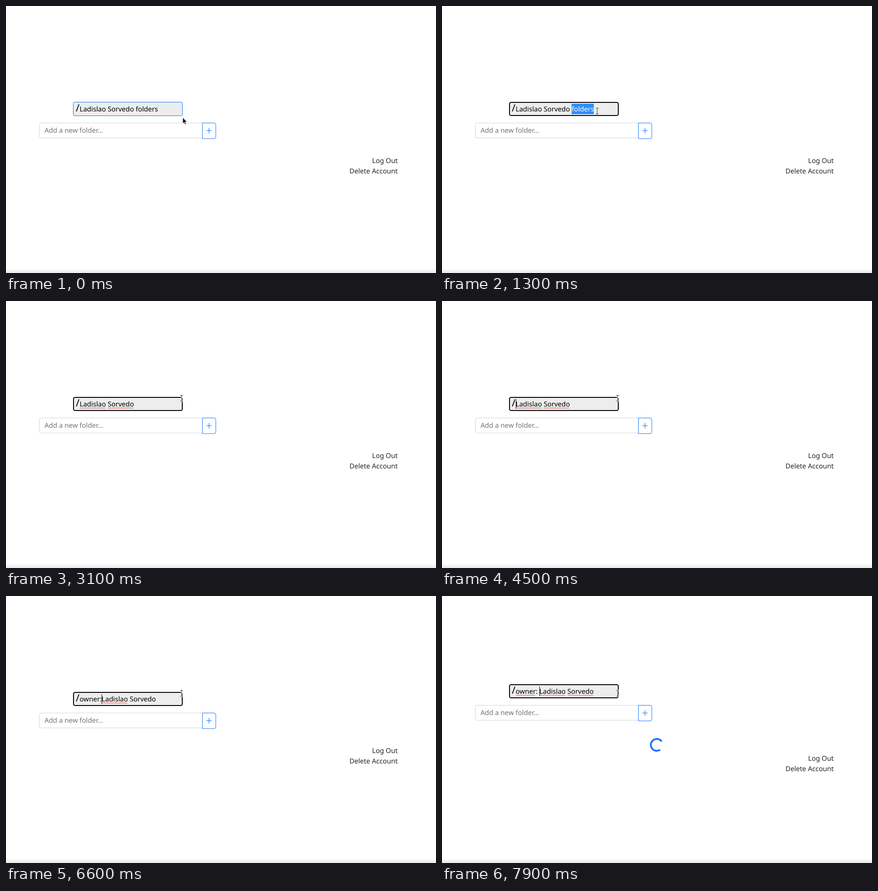
These frames come from a looping animation (949x590 px, 8000 ms). An HTML page:

```html
<!DOCTYPE html>
<html lang="en">
<head>
<meta charset="utf-8">
<title>Folder rename</title>
<style>
  html, body { margin: 0; width: 100%; height: 100%; overflow: hidden; background: #fff; }
  svg { display: block; width: 949px; height: 590px; }
  text {
    font: 15px "Noto Sans", sans-serif;
    white-space: pre;
    text-rendering: geometricPrecision;
  }
  .slash { font-size: 22px; font-weight: 500; }
  .hint { fill: #6c757d; }
  .links { fill: #212529; text-anchor: end; }
  .tip { font-size: 13.125px; fill: #fff; text-anchor: middle; }
  .accent { fill: none; stroke: #0d6efd; }
</style>
</head>
<body>
<svg viewBox="0 0 949 590">
  <defs>
    <linearGradient id="shade" x2="0" y2="1">
      <stop offset="0" stop-color="#fff"/>
      <stop offset="1" stop-color="#e9e9e9"/>
    </linearGradient>
    <linearGradient id="track" x2="0" y2="1">
      <stop offset="0" stop-color="#dedede"/>
      <stop offset=".3" stop-color="#ececec"/>
      <stop offset="1" stop-color="#eaeaea"/>
    </linearGradient>
  </defs>

  <rect y="580" width="949" height="10" fill="url(#shade)"/>

  <g id="upper">
    <rect id="field" rx="3.5" fill="#ededed"/>
    <text class="slash" x="154" y="233">/</text>
    <rect id="selection" y="216" height="23" fill="#308cff"/>
    <text id="title" x="162.6" y="233"><tspan id="head"></tspan><tspan id="tail"></tspan></text>
    <path id="squiggle" fill="none" stroke="#f01010" stroke-width=".9"/>
    <rect id="caret" y="217" width="1" height="21"/>

    <path d="M433 258.5H77.5a4 4 0 0 0-4 4v25a4 4 0 0 0 4 4H433" fill="none" stroke="#ced4da"/>
    <text class="hint" x="85" y="280">Add a new folder...</text>
    <path class="accent" d="M433.500 258.500h25.500a4 4 0 0 1 4 4v26.500a4 4 0 0 1-4 4h-25.500z"/>
    <path class="accent" d="M442.500 275.500h11M448 270v11" stroke-width="1.200" stroke-linecap="round"/>
  </g>

  <circle id="spinner" class="accent" cx="474" cy="329" r="13.125" stroke-width="3.75"
          pathLength="360" stroke-dasharray="270 90" transform="rotate(55 474 329)"/>

  <g id="lower" class="links">
    <text x="864.5" y="347">Log Out</text>
    <text x="864.5" y="369.500">Delete Account</text>
  </g>

  <g id="tooltip">
    <rect x="401" y="215" width="186" height="27" rx="3.75" fill="#1a1a1a"/>
    <text class="tip" x="494" y="233">Double click to modify</text>
  </g>

  <g id="scrollbar">
    <rect y="577" width="949" height="13" fill="url(#track)"/>
    <rect x="13" y="579" width="654" height="10" fill="#b8b8b8"/>
    <path d="M8 581v6l-4-3z" fill="#888"/>
    <path d="M941 581v6l4-3z" fill="#222"/>
  </g>

  <path id="arrow" d="M0 0V13.500L3.200 10.700L5.300 15.300L7.500 14.300L5.400 9.800H9.500Z"
        fill="#111" stroke="#fff" stroke-width=".8" transform="translate(390 246.500)"/>
  <g id="beam" fill="none">
    <path d="M-3-6.500H-1L0-6L1-6.500H3M0-6V6M-3 6.500H-1L0 6L1 6.500H3" stroke="#fff" stroke-width="3"/>
    <path d="M-3-6.500H-1L0-6L1-6.500H3M0-6V6M-3 6.500H-1L0 6L1 6.500H3" stroke="#222" stroke-width="1.100"/>
  </g>
</svg>

<script>
const LOOP = 8000, TEXT_X = 162.6, SHIFT = 17;
const NAME = 'Ladislao Sorvedo ';
const el = id => document.getElementById(id);

// Each step lists only what changes; caret is a character index or null.
const steps = [
  [0, { head: NAME, tail: 'folders', beam: null, tip: 0, focus: false, selected: false,
        wrong: [], caret: null, busy: false }],
  [100, { beam: [380, 241], tip: 0.5 }],
  [700, { beam: [342.5, 232], tip: 1 }],
  [1200, { focus: true, selected: true, tip: 0.5 }],
  [1300, { tip: 0 }],
  [1500, { beam: [366, 226] }],
  [1600, { beam: [387.5, 215] }],
  [2300, { wrong: [0, 1, 2] }],
  [2500, { tail: '', selected: false, wrong: [0, 1], caret: NAME.length }],
  [3100, { caret: null }],
  [3600, { caret: NAME.length }],
  [4200, { caret: null }],
  [4500, { caret: 0 }],
  ...[4900, 5300, 5500, 5800, 5900, 6600, 6700].map((time, i) =>
    [time, { head: 'owner: '.slice(0, i + 1) + NAME, caret: i + 1, wrong: [1] }]),
  [6700, { wrong: [0, 1, 2] }],
  [7300, { caret: null }],
  [7900, { caret: 7, busy: true }]
];

const show = (id, on) => el(id).setAttribute('visibility', on ? 'visible' : 'hidden');
const set = (id, attrs) => {
  for (const key in attrs) el(id).setAttribute(key, attrs[key]);
};
const xAt = index => TEXT_X + (index ? el('title').getSubStringLength(0, index) : 0);

function zigzag(from, to) {
  let d = `M${from} 237.5`;
  for (let x = from + 2, up = true; x <= to; x += 2, up = !up) d += `L${x} ${up ? 235.5 : 237.5}`;
  return d;
}

function render(s) {
  el('head').textContent = s.head;
  el('tail').textContent = s.tail;
  set('tail', { fill: s.selected ? '#fff' : '#000' });

  const border = s.focus ? 2 : 1;
  set('field', {
    x: 148 + border / 2, y: 212 + border / 2, width: 242 - border, height: 31 - border,
    stroke: s.focus ? '#000' : '#0d6efd', 'stroke-width': border
  });

  show('selection', s.selected);
  if (s.selected) set('selection', { x: 286, width: 49 });

  const words = [...(s.head + s.tail).matchAll(/\w+/g)];
  set('squiggle', {
    d: s.wrong.map(i => {
      const { index, 0: word } = words[i];
      return zigzag(Math.round(xAt(index)) + 0.5, xAt(index + word.length));
    }).join('')
  });

  show('caret', s.caret !== null);
  if (s.caret !== null) set('caret', { x: Math.max(163, Math.floor(xAt(s.caret))) });

  set('tooltip', { opacity: s.tip });
  show('scrollbar', s.tip > 0);
  show('arrow', !s.beam);
  show('beam', s.beam);
  if (s.beam) set('beam', { transform: `translate(${s.beam})` });

  const shift = s.busy ? SHIFT : 0;
  set('upper', { transform: `translate(0 ${-shift})` });
  set('lower', { transform: `translate(0 ${shift})` });
  show('spinner', s.busy);
}

let start, shown = -1;
function tick(now) {
  start ??= now;
  const time = (now - start) % LOOP;
  const count = steps.filter(([at]) => at <= time).length;
  if (count !== shown) {
    shown = count;
    render(Object.assign({}, ...steps.slice(0, count).map(step => step[1])));
  }
  requestAnimationFrame(tick);
}
tick(performance.now());
</script>
</body>
</html>
```
